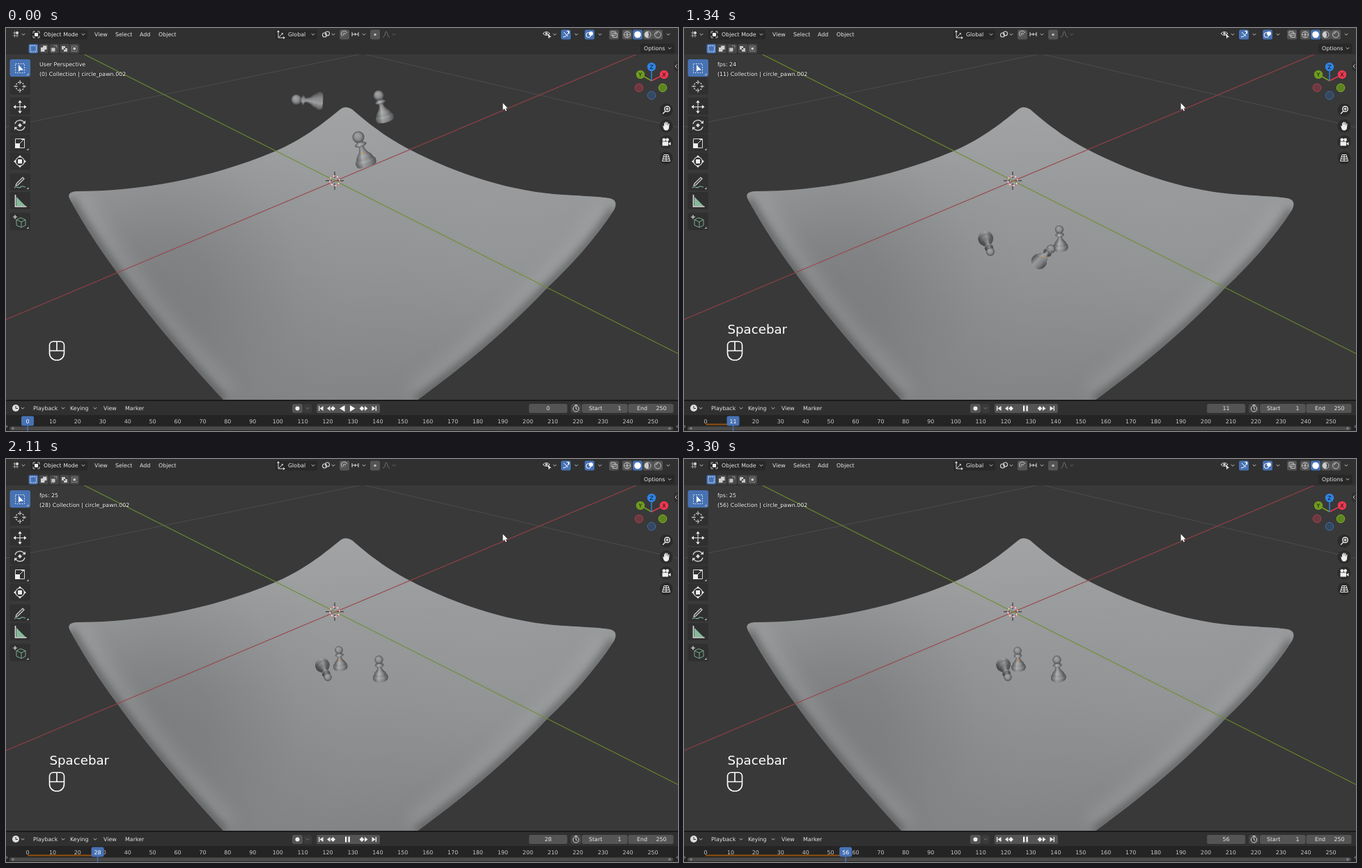
Animation, 965 px wide and 580 px high, one loop 3370 ms. Source, as an HTML page with a canvas:

```html
<!DOCTYPE html>
<html lang="en">
<head>
<meta charset="utf-8">
<title>Falling pawns</title>
<style>
html, body { margin: 0; width: 965px; height: 580px; overflow: hidden; background: #393939; }
canvas { display: block; }
</style>
</head>
<body>
<canvas id="stage" width="965" height="580"></canvas>
<script>
const LOOP = 3370, START = 990, STEP = 70;
const BLUE = '#4772b3', FIELD = '#545454', BAR = '#303030', DARK = '#282828', ICON = '#d9d9d9';
const stage = document.getElementById('stage');
const view = stage.getContext('2d');
const backdrop = document.createElement('canvas');
backdrop.width = 965;
backdrop.height = 580;
let g = backdrop.getContext('2d');

// ---------- drawing helpers ----------
function text(s, x, y, { size = 7.9, color = '#e6e6e6', align = 'left', shadow = false } = {}) {
  g.save();
  if (shadow) {
    g.shadowColor = '#000';
    g.shadowBlur = 2;
  }
  g.font = size + 'px "DejaVu Sans", sans-serif';
  g.fillStyle = color;
  g.textAlign = align;
  g.fillText(s, x, y);
  g.restore();
}
function box(x, y, w, h, color, r = 2.5) {
  g.fillStyle = color;
  g.beginPath();
  g.roundRect(x, y, w, h, r);
  g.fill();
}
function line(d, color = ICON, width = 1) {
  g.strokeStyle = color;
  g.lineWidth = width;
  g.stroke(new Path2D(d));
}
function fill(d, color = ICON) {
  g.fillStyle = color;
  g.fill(new Path2D(d));
}
function dot(x, y, r, color) {
  g.fillStyle = color;
  g.beginPath();
  g.arc(x, y, r, 0, 7);
  g.fill();
}
function ring(x, y, r, color = ICON, width = 1) {
  g.strokeStyle = color;
  g.lineWidth = width;
  g.beginPath();
  g.arc(x, y, r, 0, 7);
  g.stroke();
}
function chevron(x, y, color = '#c0c0c0') {
  line(`M${x - 2.3} ${y - 1}l2.3 2.3 2.3 -2.3`, color, 1);
}
function at(x, y, draw) {
  g.save();
  g.translate(x, y);
  draw();
  g.restore();
}

// ---------- still scene ----------
function drawCloth() {
  const left = 'C250 468 195 402 159 351C125 305 105 270 92 247';
  const right = 'C845 305 810 343 778 373C715 440 650 492 590 536';
  const cloth = new Path2D('M480 117Q487 111 497 117C530 146 555 162 578 174C650 212 730 236 800 240' +
    'C835 242 855 243 867 245Q880 248 873 262' + right + 'H313' + left +
    'Q86 236 101 235C190 235 290 218 385 178C425 161 452 140 480 117Z');
  g.save();
  g.clip(cloth);
  const tone = g.createLinearGradient(470, 114, 490, 536);
  tone.addColorStop(0, '#a1a3a4');
  tone.addColorStop(.25, '#999b9c');
  tone.addColorStop(.55, '#919394');
  tone.addColorStop(1, '#828485');
  g.fillStyle = tone;
  g.fillRect(0, 100, 965, 440);
  const shade = (x, y, r, rgb, a) => {
    const s = g.createRadialGradient(x, y, 0, x, y, r);
    [1, .85, .5, .15, 0].forEach((v, i) => s.addColorStop(i / 4, `rgba(${rgb},${a * v})`));
    g.fillStyle = s;
    g.fillRect(0, 100, 965, 440);
  };
  shade(220, 370, 270, '70,72,73', .27);
  shade(720, 330, 200, '160,162,163', .15);
  const edges = 'M313 536' + left + 'M873 262' + right;
  g.filter = 'blur(12px)';
  line(edges, 'rgba(185,187,188,.26)', 50);
  g.filter = 'blur(6px)';
  line(edges, 'rgba(64,65,65,.6)', 13);
  g.restore();
}

function drawViewport() {
  g.fillStyle = '#393939';
  g.fillRect(0, 0, 965, 580);
  line('M0 142.5L512 37L965 143', '#4c4c4c');
  drawCloth();
  line('M0 419.5L905 38', '#994048', 1.1);
  line('M112.5 38L965 468.5', '#6a8f2b', 1.1);
}

function drawCursor3d() {
  at(472, 219.8, () => {
    line('M-13 0H-4M4 0H13M0 -13V-4M0 4V13', '#222', 1);
    ring(0, 0, 7, '#f2f2f2', 1.2);
    g.setLineDash([2.75, 2.75]);
    ring(0, 0, 7, '#d2454b', 1.2);
    g.setLineDash([]);
  });
}

function drawToolbar() {
  [58, 84, 113, 140, 166, 192, 222, 249, 279].forEach((y, i) => {
    box(5.5, y - 13, 29.5, 25, i ? BAR : BLUE, 3);
    if ([0, 4, 6, 8].includes(i)) fill(`M32.5 ${y + 7}v3h-3z`, '#bbb');
  });
  g.setLineDash([2, 1.5]);
  line('M13.5 51.5h13v13h-13z', '#dfe6f0', .9);
  ring(20, 84, 6, ICON, 1.3);
  g.setLineDash([]);
  fill('M18 53v10l2.4-2.3 4.6-.2z', '#fff');
  line('M20 75v6M20 87v6M11 84h6M23 84h6', ICON, 1);
  line('M20 106v15M12.5 113.5h15', ICON, 1.1);
  fill('M20 104l2.8 3.6h-5.6zM20 123l2.8-3.6h-5.6zM10.5 113.5l3.6-2.8v5.6zM29.5 113.5l-3.6-2.8v5.6z', '#eee');
  line('M13 138a7.2 7.2 0 0 1 13-2M27 142a7.2 7.2 0 0 1-13 2', ICON, 1.3);
  fill('M28 133v4.5h-4.5zM12 147v-4.5h4.5zM20 137l3 3-3 3-3-3z');
  line('M13.5 159.5h13v13h-13z', ICON, 1);
  fill('M13 166h7v7h-7z', '#eee');
  line('M20 166l5-5M22 160.5h4.5v4.5', ICON, 1);
  ring(20, 192, 6.2, ICON, 1.1);
  fill('M17 189h6v6h-6zM20 183l2.5 3h-5zM20 201l2.5-3h-5zM11 192l3-2.5v5zM29 192l-3-2.5v5z', '#eee');
  line('M15 224l9-9 2 2-9 9-3 1z', ICON, 1.2);
  line('M12 230c4-4 6 2 9-1s4 0 7 0', '#7fb79a', 1.1);
  fill('M15 243v13h13zM18 251v2.5h2.5z', '#86b89b');
  line('M13.5 240v17h16', '#e4e4e4', 1.6);
  line('M15 276l6-3 7 3v8l-6 3-7-3zM15 276l7 3 6-3M22 279v8', '#78ab91', 1);
  line('M13 269v6M10 272h6', '#eee', 1.1);
}

function drawGizmo() {
  const axes = [
    [909, 86, '#6d3940', '#a83f4c'], [927, 97, '#35485f', '#3c6ca6'], [943, 86, '#5d8420', '#7fae26'],
  ];
  axes.forEach(([x, y, inner, rim]) => { dot(x, y, 5.8, inner); ring(x, y, 5.8, rim, 1); });
  line('M927 76L911 67', '#76a31e', 1.5);
  line('M927 76L945 67', '#e8394f', 1.5);
  line('M927 76V56', '#2f83e3', 1.5);
  [[911, 67, '#6f9c1e', 'Y'], [945, 67, '#ee3850', 'X'], [927, 56, '#2f83e3', 'Z']].forEach(([x, y, c, s]) => {
    dot(x, y, 6.2, c);
    text(s, x, y + 2.9, { color: '#111', align: 'center' });
  });
  box(959, 48, 10, 14, BAR, 3);
  line('M963.5 52.5l-2.5 2.5 2.5 2.5', '#ccc');

  [118, 141, 164, 187].forEach(y => dot(948, y, 9.5, '#2b2b2b'));
  ring(949.5, 116.5, 3.8, '#eee', 1.4);
  line('M947 119.5l-4 4M947.5 116.5h4M949.5 114.5v4', '#eee', 1.3);
  fill('M943 140l2 1.5v-5h1.3v4l.6-5.5h1.3v5.5l.8-5h1.3v5.5l1-3.5h1.3l-.7 7q-1 3-4 3t-4-4z', '#eee');
  fill('M942.5 163.5h8.5v6h-8.5zM951.5 166l3-2v5l-3-2z', '#eee');
  dot(944.8, 160.8, 2.4, '#eee');
  dot(949.6, 160.8, 2.4, '#eee');
  line('M945 182.5h6l2.5 9h-11zM944 185.5h8M943 188.5h10M948 182.5v9', '#eee', 1);
}

function drawHeader() {
  g.fillStyle = BAR;
  g.fillRect(0, 0, 965, 38);
  line('M10 7h8M10 11h8M12.5 4.5v9M16 4.5v9', '#bbb', .8);
  dot(16, 7, 2, ICON);
  chevron(25, 9);
  box(35, 2.5, 82, 14, DARK);
  line('M39 8v-3h3M45 5h3v3M48 11v3h-3M42 14h-3v-3', '#ccc', .9);
  fill('M41 7h5v5h-5z', '#eee');
  text('Object Mode', 54, 12);
  chevron(111, 9);
  [['View', 127], ['Select', 157], ['Add', 192], ['Object', 219]].forEach(([s, x]) => text(s, x, 12));

  box(387, 2.5, 60, 14, DARK);
  line('M391 14V5M391 14h8M391 14l5-5', ICON, 1);
  fill('M391 3l2 3h-4zM401 14l-3-2v4zM398 7l-3 .4 2.5 2.5z');
  text('Global', 405, 12);
  chevron(441, 9);
  ring(457.5, 10, 3, ICON, 1.1);
  ring(461.5, 8, 3, ICON, 1.1);
  chevron(470, 9);
  box(479, 2.5, 14, 14, FIELD);
  line('M483 12l-1-2a4 4 0 0 1 6-5l2 2M485.5 11l-1-1.5a1.5 1.5 0 0 1 2-2l1.5 1.5', '#aaa', 1.2);
  line('M497 6v6M497 9h9M501.5 7v4M506 6v6', ICON, 1);
  chevron(514, 9);
  box(523, 2.5, 14, 14, FIELD);
  dot(530, 9.5, 1.8, '#bbb');
  line('M541 13c4 0 3-8 5-8s1 8 5 8', '#777', 1);
  chevron(557, 9, '#666');

  line('M771 8q5-5 10 0q-5 5-10 0z', ICON, 1);
  dot(776, 8, 1.7, ICON);
  fill('M778 8l5 5-2.5 .3-1 2.2z', '#fff');
  chevron(788, 9);
  [[797, BLUE], [831, BLUE], [866, FIELD], [885, FIELD], [900, BLUE], [915, FIELD], [929, FIELD]]
    .forEach(([x, c]) => box(x, 2.5, 14, 14, c));
  line('M800 13q7-1 8-8M801 6l6 6M805 4.5h3.5v3.5', '#fff', 1);
  chevron(819, 9);
  ring(836.5, 10, 3.5, '#fff', 1);
  dot(840, 8, 3, '#fff');
  chevron(853, 9);
  line('M869 5h6v6h-6zM871.5 7.5h6v6h-6z', '#ccc', .9);
  ring(892, 9.5, 4.5, '#ccc', .9);
  line('M887.5 9.5h9M892 5v9M889.5 6q5 3.5 0 7M894.5 6q-5 3.5 0 7', '#ccc', .6);
  dot(907, 9.5, 4.8, '#fff');
  ring(921.5, 9.5, 4.5, '#ccc', .9);
  fill('M921.5 5a4.5 4.5 0 0 0 0 9q3-4.5 0-9z', '#ccc');
  ring(936, 9.5, 4.5, '#ccc', .9);
  line('M933.5 9a2.5 2.5 0 0 1 2.5-2.5', '#ccc', .9);
  chevron(951, 9);

  [39, 54, 69, 84, 98].forEach((x, i) => box(x - 6.5, 23, 13.5, 13.5, i ? '#484848' : BLUE, 2));
  g.setLineDash([1.5, 1]);
  line('M35 25.5h8.5v8.5H35z', '#fff', .9);
  line('M69 25.5h4v4M65 29v5h4', '#bbb', .9);
  line('M94.5 26h7.5v7.5h-7.5z', '#aaa', .9);
  g.setLineDash([]);
  fill('M50 28h3v-2.5h5.5v5.5h-3v3H50z', '#d0d0d0');
  fill('M65.5 28.5h5v5h-5zM80 26h5v5h-5zM83 29h5v5h-5zM96.5 28h3.5v3.5h-3.5z', '#c4c4c4');
  fill('M83 29h2v2h-2z', '#444');
  box(911, 22.5, 49, 14, DARK);
  text('Options', 916, 32);
  chevron(953, 29);
}

function drawTimelineFrame() {
  g.fillStyle = '#1b1b1b';
  g.fillRect(0, 535, 965, 45);
  g.fillStyle = BAR;
  g.fillRect(0, 537, 965, 20);
  g.fillStyle = '#242424';
  g.fillRect(0, 557, 965, 23);
  dot(14, 547, 5, '#ddd');
  line('M14 544v3.5h3', '#333', 1);
  chevron(24, 547);
  text('Playback', 39, 550);
  chevron(82, 547);
  text('Keying', 92, 550);
  chevron(128, 547);
  text('View', 140, 550);
  text('Marker', 171, 550);
  box(411, 541, 15, 13, FIELD);
  dot(418.5, 547.5, 3, '#eee');
  box(427, 541, 12, 13, '#3a3a3a');
  chevron(433, 547, '#777');
  box(446, 541, 91, 13, FIELD);
  fill('M449 544h1.3v7H449zM455.5 544v7l-5-3.5zM530.7 544h1.3v7h-1.3zM525.5 544v7l5-3.5z', '#eee');
  fill('M461 547.5l4.5-3.5v7zM466 547.5l3.5-3.5 3.5 3.5-3.5 3.5zM519.5 547.5l-4.5-3.5v7z' +
    'M514.5 547.5l-3.5-3.5-3.5 3.5 3.5 3.5z', '#eee');
  box(751, 541, 55, 13, FIELD);
  box(811, 541, 15, 13, '#444');
  ring(818.5, 548, 4.2, ICON, 1);
  line('M818.5 548v-2.8M816.5 542.5h4M818.5 548l2 1', ICON, 1);
  box(827, 541, 65.5, 13, FIELD);
  box(893.5, 541, 65, 13, FIELD);
  text('Start', 837, 550);
  text('1', 883.5, 550, { align: 'right' });
  text('End', 906, 550);
  text('250', 948.5, 550, { align: 'right' });
  for (let n = 0; n <= 250; n += 10) {
    text(n, frameX(n), 568.5, { color: '#c8c8c8', align: 'center' });
  }
  box(5, 573.5, 953, 5.5, '#4a4a4a', 2.7);
  dot(10, 576.2, 2, '#777');
  dot(953, 576.2, 2, '#777');
  line('M0 571.5l2 2-2 2M965 571.5l-2 2 2 2', '#aaa');
}

function drawMouseIcon() {
  g.strokeStyle = '#fff';
  g.lineWidth = 1.6;
  g.beginPath();
  g.roundRect(62.5, 451.3, 21, 26.7, [5, 5, 10, 10]);
  g.stroke();
  line('M62.5 464.5h21M73 451v13.5', '#fff', 1.6);
}

// ---------- pawns ----------
// Each key: step, base x, base y, head x, head y, base radius, disc tilt (negative: head points away).
const leaning = [
  [-1, 518, 197, 506, 157, 15, .25], [0, 518, 221, 506, 182, 14.5, .25], [3, 518, 331, 508, 291, 12, .3],
  [5, 508, 338, 527, 318, 11, -.8], [9, 516, 311, 513, 284, 10.5, .45], [16, 480.5, 301, 478, 275, 10.2, .45],
  [26, 480.5, 302, 479, 276, 10.2, .45],
];
const upright = [
  [-1, 545, 133, 535, 97, 13, .25], [0, 543, 155, 534, 119, 12.5, .25], [3, 543, 304, 536, 272, 11.3, .35],
  [5, 541, 318, 539, 290, 10.7, .45], [9, 538, 317, 535.5, 289, 10.8, .45],
];
const lying = [
  [-1, 454, 105, 417, 103, 13, .1], [0, 455, 128, 419, 126, 12.5, .1], [3, 445, 265, 414, 270, 11, .2],
  [5, 432.5, 301, 440, 322, 10.7, .85], [9, 433, 300, 451, 319, 10, .85], [16, 453.5, 295, 462, 314, 10.2, .85],
  [26, 458, 294.5, 465, 314, 10.2, .85],
];
// Lathe profile: height along the axis, radius.
const profile = [[0, .93], [.06, 1], [.16, 1], [.21, .84], [.25, .82], [.32, .74], [.42, .5], [.52, .33],
  [.62, .26], [.68, .32], [.71, .58], [.75, .58], [.79, .34], [.9, .3], [1.1, .3]];

function radius(h) {
  const i = Math.max(1, profile.findIndex(p => p[0] >= h));
  const [h0, r0] = profile[i - 1], [h1, r1] = profile[i];
  return r0 + (r1 - r0) * Math.max(0, (h - h0) / (h1 - h0));
}

function pose(keys, k) {
  const i = keys.findIndex(key => key[0] > k);
  if (i < 0) return keys[keys.length - 1].slice(1);
  if (i === 0) return keys[0].slice(1);
  const from = keys[i - 1], to = keys[i];
  let u = (k - from[0]) / (to[0] - from[0]);
  if (from[0] === 0) u *= .45 + .55 * u;      // free fall
  else if (from[0] >= 9) u *= 2 - u;          // coming to rest
  return from.slice(1).map((v, j) => v + (to[j + 1] - v) * u);
}

const gray = v => `rgb(${v},${v + 2},${v + 3})`;

function drawPawn([bx, by, hx, hy, size, tilt]) {
  const angle = Math.atan2(hy - by, hx - bx), length = Math.hypot(hx - bx, hy - by);
  const up = -Math.sin(angle), count = 44;
  const body = () => at(bx, by, () => {
    g.rotate(angle);
    for (let i = 0; i <= count; i++) {
      const h = .9 * (tilt > 0 ? i : count - i) / count;
      const r = radius(h) * size;
      const slope = radius(h + .02) - radius(h - .02);
      const v = 150 - Math.max(-18, Math.min(40, slope * 190 * up));
      const tone = g.createLinearGradient(0, -r, 0, r);
      tone.addColorStop(0, gray(v * .58));
      tone.addColorStop(.35, gray(v * 1.04));
      tone.addColorStop(.7, gray(v * .86));
      tone.addColorStop(1, gray(v * .52));
      g.fillStyle = tone;
      g.beginPath();
      g.ellipse(h * length, 0, Math.max(.7, Math.abs(tilt) * r), r, 0, 0, 7);
      g.fill();
    }
  });
  const head = () => {
    const r = size * .57;
    const tone = g.createRadialGradient(hx - r * .25, hy - r * .35, 0, hx, hy, r);
    tone.addColorStop(0, gray(164));
    tone.addColorStop(.6, gray(138));
    tone.addColorStop(1, gray(78));
    dot(hx, hy, r, tone);
  };
  if (tilt > 0) { body(); head(); } else { head(); body(); }
}

// ---------- moving parts ----------
function frameX(n) { return 31 + n * 3.592; }

function fps(k) {
  if (k < 1) return 35;
  if (k < 7) return 24;
  return k % 17 > 7 && k % 17 < 13 ? 26 : 25;
}

function drawTimeline(frame, playing) {
  const x = frameX(frame);
  if (playing) {
    g.fillStyle = '#94500f';
    g.fillRect(31, 569.5, x - 31, 2);
    fill('M487 543.5h2.2v8H487zM491.5 543.5h2.2v8h-2.2z', '#fff');
  } else {
    fill('M486.5 543v9l-7.5-4.5zM494 543v9l7.5-4.5z', '#fff');
  }
  g.fillStyle = BLUE;
  g.fillRect(x - .75, 572, 1.5, 8);
  box(x - 9, 558.5, 18, 14, BLUE);
  text(frame, x, 568.5, { color: '#fff', align: 'center' });
  text(frame, 778.5, 550, { align: 'center' });
}

function draw(time) {
  const playing = time >= START;
  const k = playing ? Math.floor((time - START) / STEP) : -1;
  const frame = playing ? Math.round(2.7 + 1.61 * k) : 0;
  g.drawImage(backdrop, 0, 0);
  const main = pose(leaning, k);
  [pose(upright, k), main, pose(lying, k)].forEach(drawPawn);
  const [bx, by, hx, hy] = main;
  dot(bx + (hx - bx) * .45, by + (hy - by) * .45, 1.3, '#e0892c');
  drawCursor3d();
  const overlay = { color: '#fff', shadow: true };
  text(playing ? 'fps: ' + fps(k) : 'User Perspective', 48, 54.5, overlay);
  text(`(${frame}) Collection | circle_pawn.002`, 48, 68.5, overlay);
  if (playing) text('Spacebar', 62.5, 440, { size: 18.2, color: '#fff' });
  drawTimeline(frame, playing);
  const arrow = 'M713.5 108v10l2.3-2 1.7 3.6 1.6-.8-1.7-3.4h3.1z';
  line(arrow, '#222', 1);
  fill(arrow, '#fff');
}

drawViewport();
drawHeader();
drawToolbar();
drawGizmo();
drawMouseIcon();
drawTimelineFrame();

g = view;
const begin = performance.now();
function tick() {
  draw((performance.now() - begin) % LOOP);
  requestAnimationFrame(tick);
}
tick();
</script>
</body>
</html>
```
